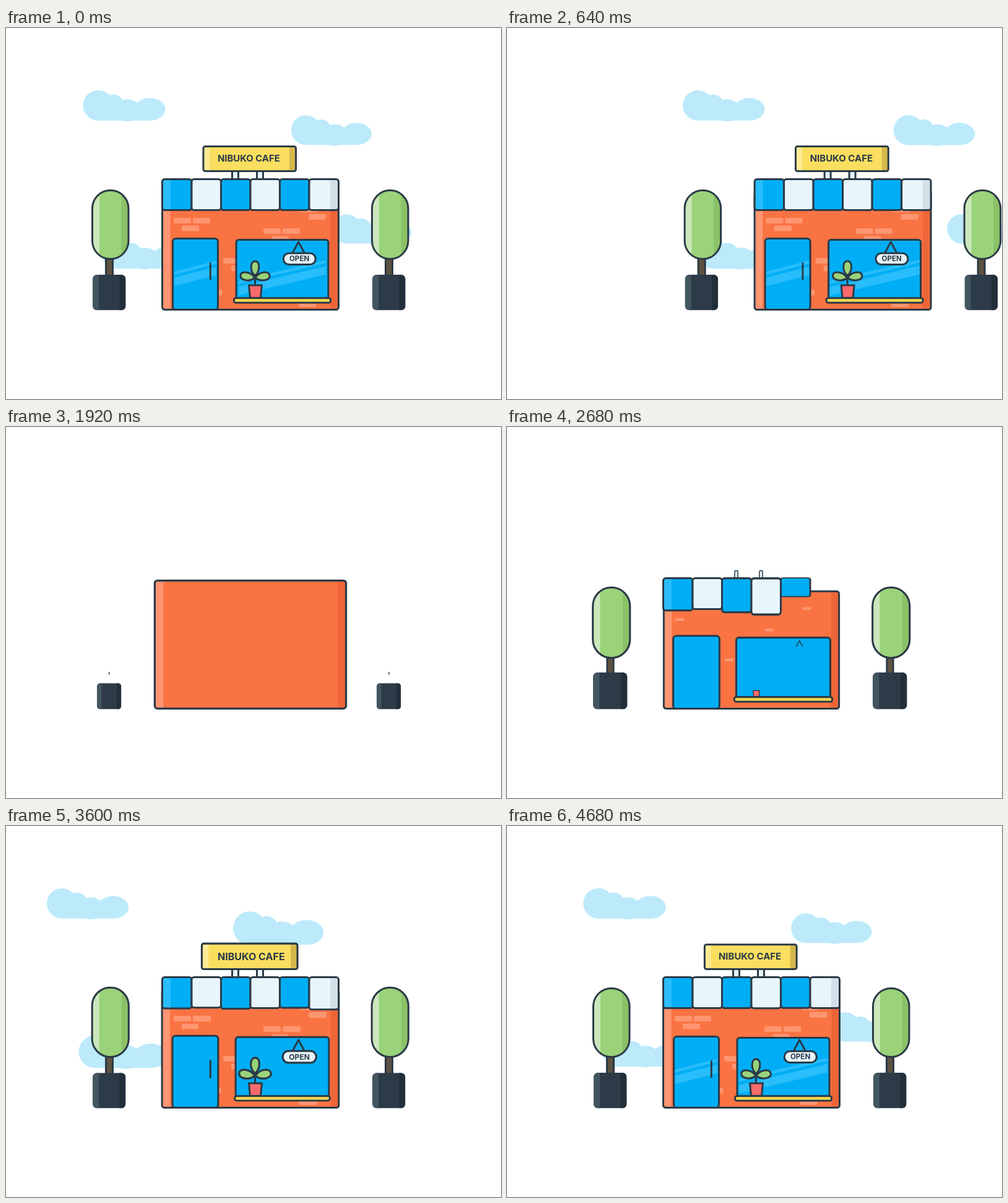
These frames come from a looping animation (800x600 px, 4720 ms). An HTML page:

```html
<!DOCTYPE html>
<html lang="en">
<head>
<meta charset="utf-8">
<title>Little shop</title>
<style>
  html, body { margin: 0; width: 100%; height: 100%; overflow: hidden; background: #fff; }
  svg { display: block; width: 800px; height: 600px; }
  text { font-family: Inter, "Liberation Sans", sans-serif; font-weight: 700; fill: #2b3a47; }
  .line { stroke: #2b3a47; stroke-width: 3; stroke-linejoin: round; stroke-linecap: round; }
</style>
</head>
<body>
<svg viewBox="0 0 800 600"><g id="scene"></g></svg>
<script>
const LOOP = 4720, EXIT_END = 1000, RISE = 180;
const BLUE = '#00aef5', SKY = '#29bdfb', ICE = '#e8f5fb', BRICK = '#ff9671';
const scene = document.getElementById('scene');
const parts = [];
let html = '', ids = 0;

const rect = (x, y, w, h, r, fill, extra = '') =>
  `<rect x="${x}" y="${y}" width="${w}" height="${h}" rx="${r}" fill="${fill}" ${extra}/>`;

const clip = (shape, body) => {
  const id = 'c' + ids++;
  return `<clipPath id="${id}">${shape}</clipPath><g clip-path="url(#${id})">${body}</g>`;
};

// Adds a group that springs open at `start` around the point (x, y), optionally seen through `pane`.
function pop(start, x, y, body, { pane, ...opts } = {}) {
  parts.push({ start, x, y, freq: 3, drift: 0, flat: false, ...opts });
  const group = `<g class="part">${body}</g>`;
  html += pane ? clip(pane, group) : group;
}

// Rounded box with an optional light strip on the left and dark strip on the right.
function box(x, y, w, h, r, fill, { light, dark, strip = 12, line = true } = {}) {
  const shape = rect(x, y, w, h, r, fill);
  let inside = shape;
  if (light) inside += rect(x, y, strip, h, 0, light);
  if (dark) inside += rect(x + w - strip, y, strip, h, 0, dark);
  return clip(shape, inside) + (line ? rect(x, y, w, h, r, 'none', 'class="line"') : '');
}

function cloud(start, x, y, drift) {
  pop(start, x, y, `<g fill="#bceafb" transform="translate(${x} ${y})">
    <circle cx="-41.7" r="24.3"/><circle cx="-17" cy="-1.5" r="16"/>
    <ellipse cx="5" cy="8" rx="22" ry="17.7"/><ellipse cx="41.3" cy="6.2" rx="24.7" ry="18.1"/>
    <rect x="-42" y="4" width="83" height="20.3"/></g>`, { drift });
}

function tree(x) {
  pop(1900, x + 167, 400, rect(x + 161.5, 368, 11, 33, 0, '#5c5140', 'class="line"'));
  pop(2020, x + 168.7, 374, box(x + 139.5, 262.5, 58.5, 111, 29.2, '#9ad37a',
    { light: '#cbe7ba', dark: '#8bc167', strip: 11.5 }));
  pop(1789, x + 166.5, 456.5, box(x + 140, 399, 53.5, 57.5, 7, '#2d3b49',
    { light: '#425660', dark: '#222f3b', strip: 10, line: false }));
}

// Two slanted bands of light inside a pane.
function shine(x, y, w, h, top, slope) {
  const rise = w * slope;
  const band = (at, thick) =>
    `<path d="M${x} ${at}l${w} ${-rise}v${thick}l${-w} ${rise}z" fill="${SKY}"/>`;
  pop(3640, x + w / 2, top + 12 - rise / 2, band(top, 5) + band(top + 10, 14),
    { pane: rect(x, y, w, h, 3, '#fff') });
}

cloud(3087, 191, 125.2, 22.5);
cloud(3295, 525.8, 165.2, 32.7);
cloud(3285, 220, 365, 11.8);
cloud(3620, 591, 325, 73);
tree(0);
tree(452);

for (const x of [365.5, 405.5])
  pop(2590, x + 5, 244, rect(x, 221, 10, 25, 3, ICE, 'class="line"'));
pop(2822, 394, 232, box(319, 191.5, 149.5, 40, 3, '#fade5f',
  { light: '#fdea92', dark: '#d5b84b', strip: 10.5 }), { freq: 3.5 });
pop(2975, 342, 211, '<text x="342" y="216.4" font-size="15">NIBUKO CAFE</text>');

pop(1317, 395, 456, box(252.5, 264.5, 285, 191, 4, '#fa7343',
  { light: '#ff9572', dark: '#ee6537', strip: 13 }));

const bricks = [
  [271, 307, 2590], [302, 307, 2700], [284, 319.5, 2800],
  [416, 324, 2590], [447, 324, 2700], [429, 336.5, 2800],
  [476, 289, 2590], [489, 301, 2700],
  [351, 372, 2590], [364, 384.5, 2700],
  [321.5, 423.5, 2830], [473.5, 442, 3060]
];
for (const [x, y, start] of bricks)
  pop(start, x + 2, y + 4.5, rect(x, y, 28, 9, 2, BRICK));

pop(2018, 306, 455.5, rect(269.5, 340.5, 73, 115, 5, BLUE, 'class="line"'));
shine(271, 342, 70, 112, 394, 0.26);
pop(2700, 330.3, 393, '<path d="M330.3 380.5v25.5" class="line"/>');

pop(2015, 446.5, 439, rect(372, 342.5, 149, 96, 4, BLUE, 'class="line"'));
shine(373.5, 344, 146, 93, 409, 0.237);

// Awning panels drop from their top edge.
[2030, 2167, 2372, 2420, 2572, 2690].forEach((start, i) => {
  const shades = { strip: 13.5 };
  if (i === 0) shades.light = SKY;
  if (i === 5) shades.dark = '#d3e0e8';
  pop(start, 0, 243.5, box(252.5 + 47.5 * i, 244.5, 47.5, 50, 4, i % 2 ? ICE : BLUE, shades),
    { flat: true });
});

pop(2990, 402.5, 403, '<path d="M402.5 397v20" class="line"/>');
for (const [x, y, turn, start] of [[402, 404, -80, 3005], [403, 404, 80, 3020], [402.5, 400.5, 0, 2990]])
  pop(start, 402.5, 404, `<path d="M0 0C-8.5-7-8.5-23 0-23.5S8.5-7 0 0z" fill="#9ad37a" class="line"
    transform="translate(${x} ${y}) rotate(${turn})"/>`);
pop(2590, 403, 436.5, '<path d="M392.5 416h21l-2 20.5h-17z" fill="#f96a6c" class="line"/>');
pop(2160, 446.5, 440.5, rect(368.5, 436.7, 156, 7.5, 3, '#fdd94f', 'class="line"'));

pop(2590, 472.7, 345, '<path d="M463 364l9.7-18l9.7 18" fill="none" class="line"/>');
pop(2700, 474.3, 373.3, rect(448.3, 364.2, 52, 18.3, 9, ICE, 'class="line"') +
  '<text x="474.1" y="377.4" font-size="11.6" text-anchor="middle">OPEN</text>');

scene.innerHTML = html;
const nodes = scene.querySelectorAll('.part');

// Linear rise, then a damped swing around full size.
function spring(age, freq) {
  if (age < RISE) return Math.max(0, age / RISE);
  const s = (age - RISE) / 1000;
  return 1 + 0.2 * Math.exp(-2 * s) * Math.sin(2 * Math.PI * freq * s);
}

function draw(ms) {
  const leaving = ms < EXIT_END;
  const time = leaving ? ms + LOOP : ms;
  const slide = leaving ? 39.2 * (Math.cosh(0.0035 * ms) - 1) : 0;
  const glide = 1 - Math.exp(-0.00115 * (time - LOOP));
  scene.setAttribute('transform', `translate(${slide.toFixed(2)} 0)`);
  parts.forEach((p, i) => {
    const k = spring(time - p.start, p.freq);
    nodes[i].style.display = k < 0.03 ? 'none' : '';
    nodes[i].setAttribute('transform',
      `translate(${p.x + p.drift * glide} ${p.y}) scale(${p.flat ? 1 : k} ${k}) translate(${-p.x} ${-p.y})`);
  });
}

const begin = performance.now();
function tick() {
  draw((performance.now() - begin) % LOOP);
  requestAnimationFrame(tick);
}
draw(0);
requestAnimationFrame(tick);
</script>
</body>
</html>
```
